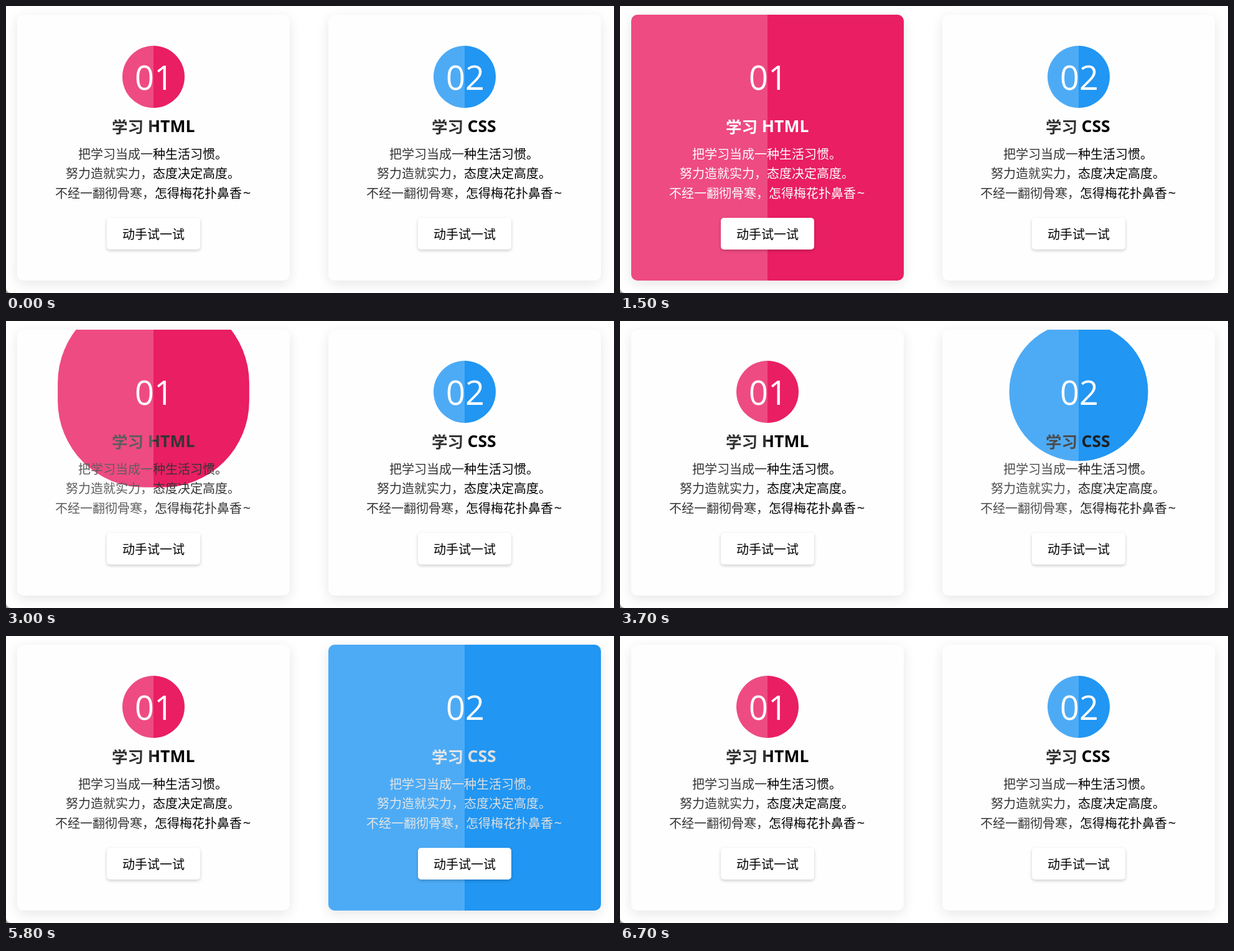
Write an HTML page with a canvas that moves like this. It is 977x462 px and loops after 7.3 s.

```html
<!DOCTYPE html>
<html lang="zh-CN">
<head>
<meta charset="utf-8">
<title>学习卡片</title>
<style>
  html, body { margin: 0; width: 100%; height: 100%; overflow: hidden; background: #fff; }
  canvas { display: block; }
</style>
</head>
<body>
<canvas id="stage" width="977" height="462"></canvas>
<script>
const ctx = document.getElementById('stage').getContext('2d');
const LOOP = 7300, STEP = 100;
const CARD = { w: 438, h: 428, top: 14, mid: 219 };
const DOT_Y = 114, DOT_R = 50, MAX_SPREAD = 500;
const CJK = '"Noto Sans CJK SC", "Noto Sans CJK", sans-serif';
const LATIN = '"Open Sans", "Noto Sans", sans-serif';

const LINES = [
  { text: '把学习当成一种生活习惯。', x: -121, y: 245.5 },
  { text: '努力造就实力，态度决定高度。', x: -141, y: 277 },
  { text: '不经一翻彻骨寒，怎得梅花扑鼻香', x: -158, y: 308.5 }
];

// enter and leave: [start, duration] in ms
const cards = [
  { left: 18, color: '#e91e63', num: '01', word: 'HTML', wordX: -9.2, cjkX: -67,
    enter: [660, 900], leave: [2510, 1000] },
  { left: 518, color: '#2196f3', num: '02', word: 'CSS', wordX: 4.6, cjkX: -53,
    enter: [3594.5, 900], leave: [5690, 920] }
];

// cubic-bezier(.25, .1, .25, 1), the CSS "ease" curve
function ease(x) {
  if (x <= 0) return 0;
  if (x >= 1) return 1;
  const bez = (u, a, b) => 3 * (1 - u) ** 2 * u * a + 3 * (1 - u) * u * u * b + u ** 3;
  let lo = 0, hi = 1;
  for (let i = 0; i < 24; i++) {
    const u = (lo + hi) / 2;
    if (bez(u, .25, .25) < x) lo = u; else hi = u;
  }
  return bez(lo, .1, 1);
}

const phase = (t, [start, length]) => ease((t - start) / length);

function box(x, y, w, h, r) {
  ctx.beginPath();
  ctx.roundRect(x, y, w, h, r);
}

function shadowBox(x, y, w, h, r, fill, alpha, blur, dy) {
  ctx.save();
  ctx.shadowColor = `rgba(0,0,0,${alpha})`;
  ctx.shadowBlur = blur;
  ctx.shadowOffsetY = dy;
  ctx.fillStyle = fill;
  box(x, y, w, h, r);
  ctx.fill();
  ctx.restore();
}

function write(text, x, y, font, color, align = 'left') {
  ctx.font = font;
  ctx.fillStyle = color;
  ctx.textAlign = align;
  ctx.fillText(text, x, y);
}

// A round dot grown by a shadow spread; corners square off once the spread passes the radius.
function drawSpread(cx, spread, color) {
  const half = DOT_R + spread;
  const ratio = spread > DOT_R ? 1 + (DOT_R / spread - 1) ** 3 : 1;
  ctx.fillStyle = color;
  box(cx - half, DOT_Y - half, half * 2, half * 2, DOT_R + spread * ratio);
  ctx.fill();
}

function drawCard(card, t) {
  const cx = card.left + CARD.mid;
  const p = phase(t, card.enter) - phase(t, card.leave);
  const level = Math.round(255 * p);
  const ink = `rgb(${level},${level},${level})`;

  shadowBox(card.left, CARD.top, CARD.w, CARD.h, 10, '#fefefe', .1, 20, 5);

  ctx.save();
  box(card.left, CARD.top, CARD.w, CARD.h, 10);
  ctx.clip();
  drawSpread(cx, p * MAX_SPREAD, card.color);
  write(card.num, cx + 1, 135, `500 54px ${LATIN}`, '#fff', 'center');
  write('学习', cx + card.cjkX, 204, `bold 25.5px ${CJK}`, ink);
  write(card.word, cx + card.wordX, 203, `bold 26.5px ${LATIN}`, ink);
  for (const line of LINES) write(line.text, cx + line.x, line.y, `20px ${CJK}`, ink);
  write('~', cx + 150, 309, `22px ${LATIN}`, ink, 'center');
  ctx.fillStyle = 'rgba(255,255,255,.2)';
  ctx.fillRect(card.left, CARD.top, CARD.mid, CARD.h);
  ctx.restore();

  shadowBox(cx - 75, 341, 150, 51, 5, '#fff', .2, 5, 2);
  write('动手试一试', cx - 50, 374.5, `20px ${CJK}`, '#000');
}

// Grey sliver outside the rounded bottom-left corner
function drawCorner() {
  ctx.fillStyle = '#999';
  ctx.beginPath();
  ctx.moveTo(0, 454);
  ctx.arcTo(0, 462, 8, 462, 8);
  ctx.lineTo(0, 462);
  ctx.fill();
}

function frame() {
  const t = Math.floor(performance.now() % LOOP / STEP) * STEP;
  ctx.fillStyle = '#fff';
  ctx.fillRect(0, 0, 977, 462);
  for (const card of cards) drawCard(card, t);
  drawCorner();
  requestAnimationFrame(frame);
}
frame();
</script>
</body>
</html>
```
